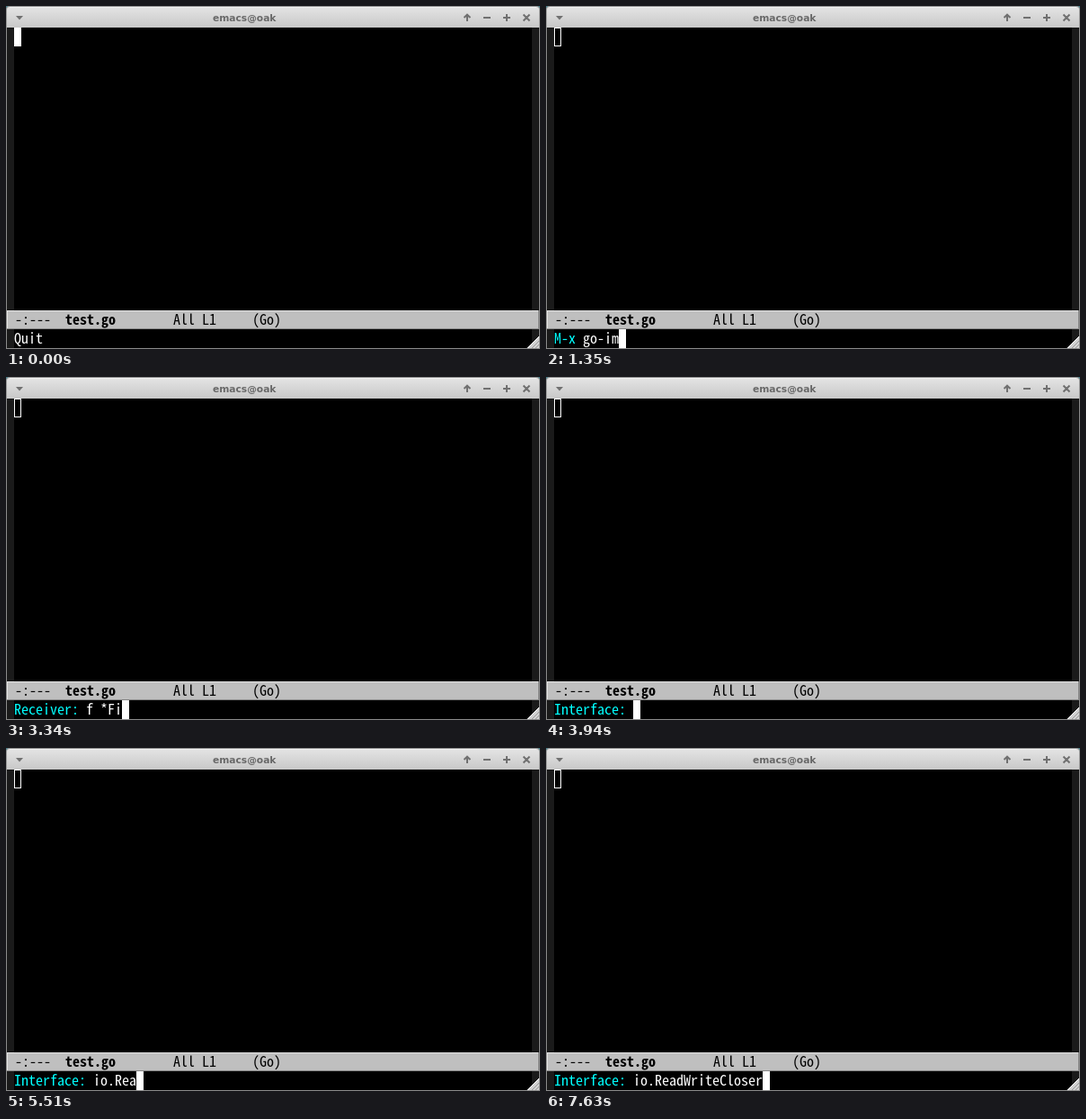
Write an HTML page that moves like this. It is 594 by 382 pixels and loops after 8 s.

```html
<!DOCTYPE html>
<html lang="en">
<head>
<meta charset="utf-8">
<title>Editor session</title>
<style>
  html, body { margin: 0; width: 100%; height: 100%; overflow: hidden; background: #000; }
  svg { display: block; width: 594px; height: 382px; }
  rect, .crisp { shape-rendering: crispEdges; }
  text { white-space: pre; }
  .mono { font: 16px "Noto Sans Mono CJK JP", "Noto Sans Mono", monospace; font-variant-ligatures: none; }
  .title { font: bold 10.67px "DejaVu Sans", sans-serif; fill: #686868; }
  .icon { fill: none; stroke: #707070; stroke-width: 2; }
</style>
</head>
<body>
<svg viewBox="0 0 594 382">
  <defs>
    <linearGradient id="bar" x1="0" y1="0" x2="0" y2="1">
      <stop offset="0" stop-color="#e4e4e4"/>
      <stop offset="1" stop-color="#c8c8c8"/>
    </linearGradient>
  </defs>

  <!-- window frame and title bar -->
  <rect width="594" height="382" fill="#8c8c8c"/>
  <rect width="594" height="4" fill="#427b87"/>
  <path d="M0 24V4Q0 0 4 0H590Q594 0 594 4V24Z" fill="#979797"/>
  <path d="M1 24V4Q1 1 4 1H590Q593 1 593 4V24Z" fill="url(#bar)"/>
  <path d="M4 1.5H590" stroke="#f2f2f2" class="crisp"/>
  <path d="M11 11H19L15 15.5Z" fill="#707070"/>
  <text class="title" x="230" y="17">emacs@oak</text>
  <path class="icon" d="M513 17V10M509.5 13L513 9.7L516.5 13M531 13H539M553 13H561M557 9V17M575.5 9.5L582.5 16.5M582.5 9.5L575.5 16.5"/>

  <!-- buffer with fringes -->
  <rect x="1" y="24" width="592" height="357" fill="#1a1a1a"/>
  <rect x="9" y="24" width="576" height="357"/>
  <rect id="point" x="9.5" y="24.5" width="7" height="20" stroke="#fff"/>

  <!-- mode line -->
  <rect x="1" y="339" width="592" height="21" fill="#bfbfbf"/>
  <path class="crisp" d="M1 339.5H593M1.5 339V360" stroke="#e6e6e6"/>
  <path class="crisp" d="M1 359.5H593M592.5 339V360" stroke="#858585"/>
  <g class="mono">
    <text x="10" y="355">-:---</text>
    <text x="66" y="355" font-weight="bold">test.go</text>
    <text x="186" y="355">All L1</text>
    <text x="274" y="355">(Go)</text>
  </g>

  <!-- minibuffer -->
  <g class="mono">
    <text id="prompt" x="9" y="376" fill="#0ff"></text>
    <text id="input" y="376" fill="#fff"></text>
  </g>
  <rect id="caret" y="360" width="8" height="21" fill="#fff"/>
  <path d="M593 368V381H580Z" fill="#d2d2d2"/>
  <path d="M580 381L593 368" stroke="#fff"/>
  <path d="M585 381L593 373M589 381L593 377" stroke="#999"/>
</svg>

<script>
  const LOOP = 8000, LEFT = 9, CELL = 8;
  const $ = id => document.getElementById(id);
  const [point, prompt, input, caret] = ["point", "prompt", "input", "caret"].map($);

  // One state per keystroke; text typed so far stays in front.
  const type = (label, before, chars, times) => times.map((at, i) => ({
    at, label, text: before + chars.slice(0, i + 1), caret: true
  }));

  const steps = [
    { at: 0, label: "", text: "Quit", caret: false, focus: true },
    { at: 330, label: "M-x ", text: "", caret: false },
    { at: 370, label: "M-x ", text: "", caret: true },
    ...type("M-x ", "", "go-impl", [650, 830, 1000, 1180, 1350, 1570, 1730]),
    { at: 2010, label: "Receiver: ", text: "", caret: true },
    ...type("Receiver: ", "", "f *File", [2350, 2490, 2770, 3080, 3340, 3540, 3640]),
    { at: 3940, label: "Interface: ", text: "", caret: true },
    { at: 4400, label: "Interface: ", text: "", caret: false },
    ...type("Interface: ", "", "io.", [4520, 4670, 4830]),
    ...type("Interface: ", "io.", "Read", [5120, 5320, 5510, 5680]),
    ...type("Interface: ", "io.Read", "Write", [5980, 6090, 6200, 6320, 6430]),
    ...type("Interface: ", "io.ReadWrite", "Closer", [6720, 6900, 7080, 7270, 7450, 7630])
  ];

  let shown;

  function show(step) {
    const column = n => LEFT + n * CELL;
    prompt.textContent = step.label;
    input.textContent = step.text;
    input.setAttribute("x", column(step.label.length));
    caret.setAttribute("x", column(step.label.length + step.text.length));
    caret.setAttribute("visibility", step.caret ? "visible" : "hidden");
    point.setAttribute("fill", step.focus ? "#fff" : "#000");
  }

  const start = performance.now();

  function tick() {
    const time = (performance.now() - start) % LOOP;
    const step = steps.findLast(s => s.at <= time);
    if (step !== shown) show(shown = step);
    requestAnimationFrame(tick);
  }

  tick();
</script>
</body>
</html>
```
